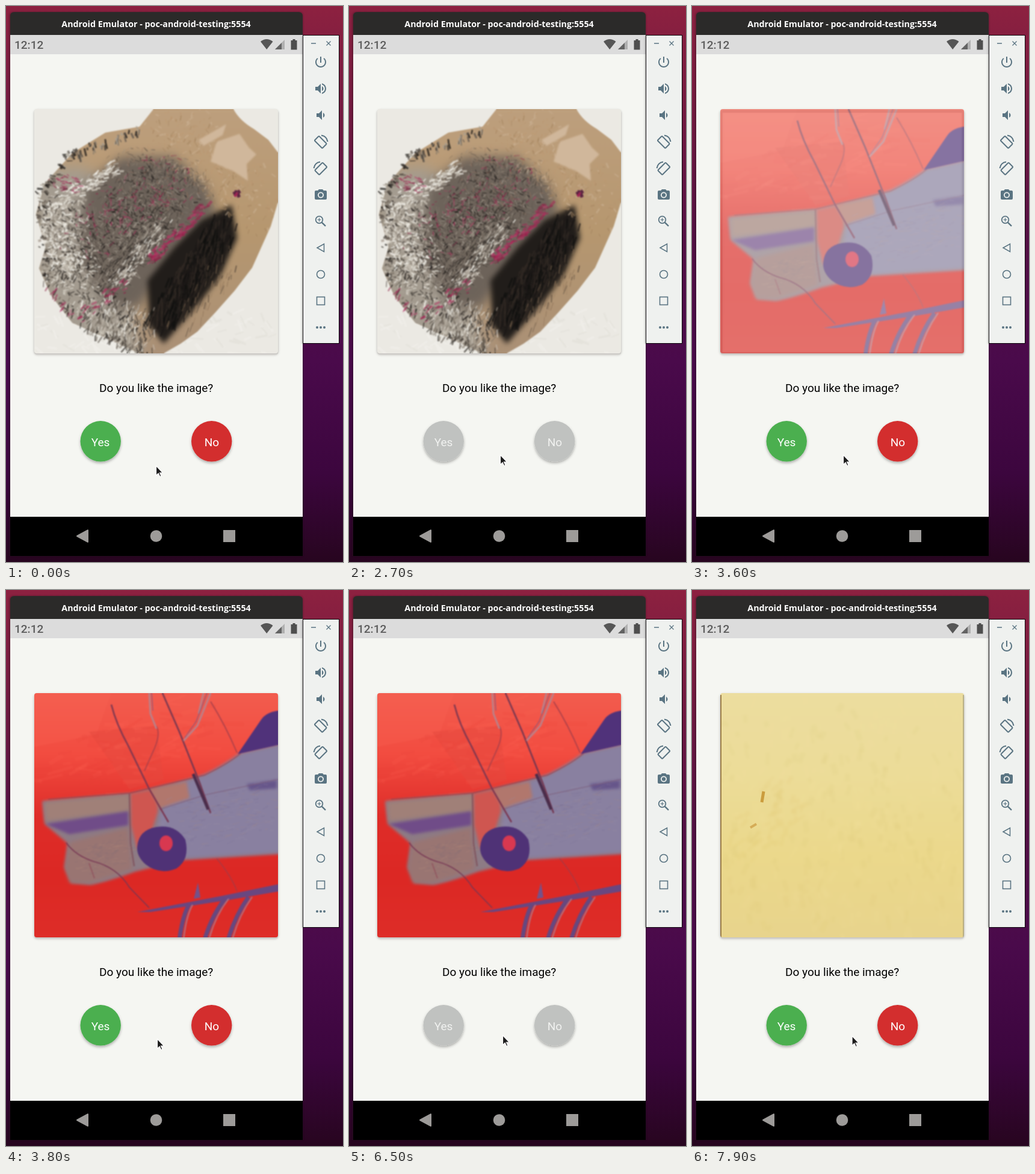
Write an HTML page with a canvas that moves like this. It is 560 px wide and 922 px high and loops after 8000 ms.

```html
<!DOCTYPE html>
<html lang="en">
<head>
<meta charset="utf-8">
<title>Image voting</title>
<style>
html, body { margin: 0; width: 100%; height: 100%; overflow: hidden; background: #4a0a48; }
svg { position: absolute; left: 0; top: 0; }
canvas { position: absolute; left: 47px; top: 171px; border-radius: 4px; }
.app { font: 19px Roboto, sans-serif; text-anchor: middle; }
.icon { fill: #5a7482; }
.line { fill: none; stroke: #5a7482; stroke-width: 1.8; }
</style>
</head>
<body>
<svg width="560" height="922" viewBox="0 0 560 922">
  <defs>
    <linearGradient id="wall" x2="0" y2="1">
      <stop offset="0" stop-color="#8d2140"/>
      <stop offset=".2" stop-color="#721940"/>
      <stop offset=".42" stop-color="#541044"/>
      <stop offset=".64" stop-color="#4a0a4b"/>
      <stop offset=".84" stop-color="#3c063e"/>
      <stop offset="1" stop-color="#27051f"/>
    </linearGradient>
    <filter id="soft" x="-20%" y="-20%" width="140%" height="140%"><feGaussianBlur stdDeviation="1.5"/></filter>
    <filter id="drop" x="-20%" y="-20%" width="140%" height="150%">
      <feDropShadow dx="0" dy="2.5" stdDeviation="2" flood-opacity=".3"/>
    </filter>
  </defs>
  <rect width="560" height="922" fill="url(#wall)"/>
  <path d="M6 912V16q0-6 6-6H487q6 0 6 6V912Z" fill="#1b1419" opacity=".5" filter="url(#soft)"/>

  <path d="M7 48V17q0-7 7-7H486q7 0 7 7V48Z" fill="#2b2a29"/>
  <text x="249.5" y="34.5" fill="#fff" text-anchor="middle" style="font:bold 14.27px 'Open Sans', sans-serif">Android Emulator - poc-android-testing:5554</text>
  <rect x="7" y="48" width="486" height="799" fill="#f5f6f2"/>
  <rect x="7" y="48" width="486" height="32" fill="#dcdcdc"/>
  <text x="14" y="71" fill="#5c5c5c" style="font:500 19px Roboto, sans-serif">12:12</text>
  <path d="M423 59q10-8 20.500 0L433.200 72Z" fill="#565656"/>
  <path d="M463 56V72H447Z" fill="#b0b0b0"/>
  <path d="M458 61V72H447Z" fill="#636363"/>
  <path d="M473.500 57H476.500V55H480.500V57H483.500V72.500H473.500Z" fill="#4e4e4e"/>

  <rect x="48" y="174" width="403" height="403" rx="4" fill="none" stroke="#bbb9b5" stroke-width="5" opacity=".6" filter="url(#soft)"/>
  <rect x="49" y="175" width="401.500" height="401" rx="2" fill="none" stroke="#cbc9c6" stroke-width="3.500"/>

  <g class="app">
    <text x="249.700" y="639.500">Do you like the image?</text>
    <g filter="url(#drop)"><circle id="yes" cx="157.200" cy="721.800" r="33.700"/></g>
    <g filter="url(#drop)"><circle id="no" cx="341.700" cy="721.800" r="33.700"/></g>
    <g id="labels" fill="#fff"><text x="157" y="729.600">Yes</text><text x="342" y="729.600">No</text></g>
  </g>

  <rect x="7" y="847" width="486" height="65"/>
  <g fill="#9d9b99">
    <path d="M118 879L136 869.200V888.800Z" stroke="#9d9b99" stroke-width="2" stroke-linejoin="round"/>
    <circle cx="249.500" cy="879" r="9.800"/>
    <rect x="361" y="869" width="20" height="20"/>
  </g>

  <rect x="491" y="50" width="3" height="510" opacity=".2" filter="url(#soft)"/>
  <rect x="493.500" y="48.500" width="60" height="511" fill="#eff1ef" stroke="#0c080c"/>
  <path class="line" style="stroke-width:1.300" d="M507 62H515M532.500 58.500L539.500 65.500M539.500 58.500L532.500 65.500"/>
  <g class="icon">
    <path transform="translate(511 81)" d="M13 3h-2v10h2V3zm4.830 2.170l-1.420 1.420C17.990 7.860 19 9.810 19 12c0 3.870-3.130 7-7 7s-7-3.130-7-7c0-2.190 1.010-4.140 2.580-5.420L6.170 5.170C4.230 6.820 3 9.260 3 12c0 4.970 4.030 9 9 9s9-4.030 9-9c0-2.740-1.230-5.180-3.170-6.830z"/>
    <path transform="translate(511 125)" d="M3 9v6h4l5 5V4L7 9H3zm13.500 3c0-1.770-1.020-3.290-2.500-4.030v8.050c1.480-.73 2.500-2.250 2.500-4.020zM14 3.230v2.060c2.890.86 5 3.540 5 6.710s-2.110 5.850-5 6.710v2.060c4.010-.91 7-4.490 7-8.770s-2.990-7.860-7-8.770z"/>
    <path transform="translate(511 169)" d="M18.500 12c0-1.770-1.020-3.290-2.500-4.030v8.050c1.480-.73 2.500-2.250 2.500-4.020zM5 9v6h4l5 5V4L9 9H5z"/>
    <path fill-rule="evenodd" transform="translate(511 301)" d="M9 3L7.170 5H4q-2 0-2 2V18q0 2 2 2H20q2 0 2-2V7q0-2-2-2H16.830L15 3ZM12 7.500a5 5 0 1 0 .01 0Z"/>
    <circle cx="523" cy="313.500" r="3.200"/>
    <circle cx="517" cy="533" r="2"/><circle cx="523" cy="533" r="2"/><circle cx="529" cy="533" r="2"/>
  </g>
  <g class="line">
    <path id="turn" stroke-width="2" d="M513.500 222L519 216.500Q520 215.500 521 216.500L532 227.500Q533 228.500 532 229.500L526.500 235Q525.500 236 524.500 235L513.500 224Q512.500 223 513.500 222ZM524 214.500Q533 216 534.500 225"/>
    <use href="#turn" transform="matrix(-1 0 0 1 1046 44)"/>
    <circle cx="520.500" cy="354.500" r="5.800"/>
    <path d="M524.800 358.800L531 365" stroke-width="2.400"/>
    <path d="M517.500 354.500H523.500M520.500 351.500V357.500" stroke-width="1.200"/>
    <path d="M517 401L528.500 394.500V407.500Z" stroke-width="1.500"/>
    <circle cx="523" cy="445" r="6.500" stroke-width="1.600"/>
    <rect x="516.500" y="482.500" width="13" height="13" stroke-width="1.600"/>
  </g>

  <path id="cursor" d="M.5 .5V16.500L4.200 13 6.800 18.500 9 17.500 6.600 12.200H11.500Z" fill="#1c1c1c" stroke="#fff" stroke-width="1.200"/>
</svg>
<script>
const SIZE = 405;
let seed = 7;
const rnd = () => {
  seed = (seed + 0x6D2B79F5) | 0;
  let t = Math.imul(seed ^ seed >>> 15, 1 | seed);
  t ^= t + Math.imul(t ^ t >>> 7, 61 | t);
  return ((t ^ t >>> 14) >>> 0) / 2 ** 32;
};
let ctx;

// Paintings are drawn in stage coordinates.
function painting(draw) {
  const canvas = document.createElement('canvas');
  canvas.width = canvas.height = SIZE;
  document.body.append(canvas);
  ctx = canvas.getContext('2d');
  ctx.translate(-47, -171);
  draw();
  return canvas;
}
const fill = (d, color) => { ctx.fillStyle = color; ctx.fill(new Path2D(d)); };
const line = (d, color, width) => {
  ctx.strokeStyle = color;
  ctx.lineWidth = width;
  ctx.stroke(new Path2D(d));
};
// Blurs what has been painted so far.
function soften(px) {
  ctx.filter = `blur(${px}px)`;
  ctx.drawImage(ctx.canvas, 47, 171);
  ctx.filter = 'none';
}
function softFill(d, color, px) {
  ctx.filter = `blur(${px}px)`;
  fill(d, color);
  ctx.filter = 'none';
}
function wash(...colors) {
  const g = ctx.createLinearGradient(0, 171, 0, 576);
  colors.forEach((c, i) => g.addColorStop(i / (colors.length - 1), c));
  return g;
}
// Short strokes scattered around the segment from (x1, y1) to (x2, y2).
function hatch(n, x1, y1, x2, y2, spread, colors, len, width, angle, sway = .5) {
  while (n--) {
    const k = rnd(), r = spread * Math.sqrt(rnd()), a = rnd() * 6.283;
    const x = x1 + (x2 - x1) * k + r * Math.cos(a);
    const y = y1 + (y2 - y1) * k + r * Math.sin(a);
    const turn = angle + (rnd() - .5) * 2 * sway, l = len * (.3 + rnd() * .7);
    line(`M${x} ${y}l${l * Math.cos(turn)} ${l * Math.sin(turn)}`,
      colors[rnd() * colors.length | 0], width * (.4 + rnd() * .6));
  }
}

function sketch() {
  const ink = ['#1c1917c0', '#39342fc0', '#5c544cc0', '#7d7468c0', '#a89f92c0'];
  const chalk = ['#e2ded5d0', '#c9c2b6d0', '#aaa196d0', '#f0ede6d0'];
  const pink = ['#a3275690', '#8f234790', '#b8356690'];
  const head = 'M222 200L245 171H378Q388 190 412 204L436 222 452 243V325L440 365 409 434 380 472 348 508 318 540 290 560 262 576H222L165 550 110 525 75 480 55 435 66 400 50 345 64 295 110 244 165 210Z';
  fill('M47 171H452V576H47Z', '#ebe9e3');
  hatch(100, 60, 540, 430, 540, 40, ['#e5e3dc', '#efede8'], 25, 4, .3, 1);
  fill(head, wash('#bd9f7d', '#b6976f', '#aa9076'));
  ctx.save();
  ctx.clip(new Path2D(head));
  softFill('M40 280L120 265 170 290 160 400 200 480 230 590 100 560 40 440Z', '#a39b8f', 12);
  softFill('M130 300L190 250 280 250 335 300 350 345 290 410 220 500 170 500 120 420Z', '#6d635a', 9);
  softFill('M375 330L384 385 355 450 315 500 262 560 238 530 235 455 280 400 325 355Z', '#211d1a', 4);
  hatch(420, 270, 190, 425, 330, 55, ['#cdb59890', '#a1815d90', '#bd9b7390', '#b8967090'], 9, 2.500, 1.5, 1.5);
  softFill('M320 222L366 196 360 214 328 232ZM350 225L388 212 404 235 416 246 400 262 402 290 378 274 340 258Z', '#d0b79b', 1);
  hatch(800, 85, 320, 110, 480, 50, [...ink, ...chalk], 11, 2.500, 1, 1.5);
  hatch(1300, 150, 420, 255, 315, 68, ink, 11, 1.6, 1.3, 1.4);
  hatch(450, 200, 275, 300, 300, 48, ['#514a4490', '#2d292590', '#9b8c7c90', '#9b746090'], 10, 1.3, 1.5, 1.5);
  hatch(150, 75, 335, 180, 270, 13, chalk, 11, 4, -.5, .5);
  hatch(200, 75, 350, 105, 430, 26, chalk, 9, 3.500, 1, 1.5);
  hatch(160, 260, 365, 180, 465, 15, chalk, 11, 2.500, -.8, .5);
  hatch(130, 255, 350, 165, 460, 22, ink, 16, 2, -.9, .3);
  hatch(400, 140, 510, 225, 535, 42, [...ink, ...chalk], 13, 2.500, 1.8, .8);
  hatch(350, 362, 365, 262, 510, 26, ['#11100fc0', '#1c1917c0', '#302923c0'], 26, 3.500, 1.8, .25);
  hatch(70, 372, 420, 290, 525, 24, ['#92765ab0', '#3a3129b0'], 18, 1.5, 1.8, .2);
  hatch(90, 328, 335, 235, 425, 9, pink, 13, 5, -.5, .4);
  hatch(35, 200, 460, 115, 520, 12, pink, 12, 4, -.6, .4);
  hatch(150, 130, 380, 280, 280, 52, pink, 11, 2, -.1, 1.7);
  hatch(35, 80, 290, 115, 300, 18, pink, 10, 2.500, .2, .5);
  hatch(10, 382, 306, 384, 309, 5, ['#a02455', '#5b2440'], 10, 5, 1.5);
  ctx.restore();
  hatch(45, 225, 202, 115, 242, 8, ink, 14, 3.500, 1.5, .4);
  hatch(45, 110, 240, 55, 310, 9, ink, 10, 4, .5, .6);
  hatch(55, 55, 320, 65, 450, 8, [...ink, ...chalk], 11, 4, .2, .6);
  hatch(35, 65, 450, 115, 515, 8, [...ink, ...pink], 12, 3, 2, .6);
  hatch(60, 130, 530, 230, 572, 9, ink, 12, 2.500, 1.9, .6);
  soften(1);
}

function abstract() {
  fill('M47 171H452V576H47Z', wash('#f25c4e', '#f24c40', '#df2d29', '#dc2824', '#de2d28'));
  fill('M47 171H175L150 240 47 260Z', '#f8665440');
  fill('M138 235L250 225 262 315 205 330Z', '#e5483f80');
  hatch(100, 70, 330, 320, 200, 60, ['#ff6b5920', '#e43c3520'], 45, 8, -.2, .4);
  softFill('M60 350L208 337 330 307Q365 290 390 271L460 255V437L300 447 215 467Q165 485 140 489L108 486 97 460 102 420 64 388Z', '#8d7b85', 2);
  softFill('M285 322L330 307Q365 290 390 271L460 255V435L300 445 250 425 255 370Z', '#8980a0', 3);
  softFill('M64 352L206 339V367L110 378 66 383Z', '#a08078', 3);
  softFill('M106 418L203 394 210 463 140 486 106 485 98 460Z', '#997572', 3);
  softFill('M66 388L203 367V390L105 405Z', '#704c88', 2);
  fill('M452 200Q432 203 424 215L385 272 452 257Z', '#50327a');
  softFill('M207 338L252 329 252 368 242 400 218 430 208 390Z', '#cf5650', 2);
  softFill('M238 331L300 318 305 345 255 362Z', '#b1776d', 2);
  softFill('M400 322L450 315V329L405 332Z', '#66558a', 2);
  hatch(220, 290, 390, 440, 360, 50, ['#9a90a640', '#776d9540', '#a5888840'], 14, 2, -.2, .4);
  hatch(140, 125, 450, 190, 430, 25, ['#8a6e7550', '#ad857a50'], 12, 2, -.2, .4);
  line('M255 364L330 340 452 314', '#7b5c79a0', 1.5);
  line('M70 347L205 337 330 307Q370 288 390 271', '#863f50b0', 1.5);
  fill('M218 426Q220 398 250 393 282 388 298 414 306 447 283 462 255 473 232 455 217 442 218 426Z', '#4f3276');
  ctx.beginPath();
  ctx.ellipse(266, 420, 11, 13, 0, 0, 7);
  ctx.fillStyle = '#d83850';
  ctx.fill();
  fill('M218 534L360 507 452 488V500L370 514 240 534Z', '#694780');
  fill('M312 512L319 485 323 510Z', '#74528a');
  for (const [x, y, w] of [[304, 522, 16], [364, 512, 34], [403, 509, 34]]) {
    line(`M${x} ${y}Q${x - w * .65} 540 ${x - w} 580`, '#66487f', 7);
    line(`M${x + 6} ${y}Q${x + 6 - w * .65} 540 ${x - w + 7} 580`, '#b07888', 2);
  }
  line('M175 190Q183 222 203 258L238 330 270 385', '#7a3650', 2.500);
  line('M260 171L288 235 322 320 340 370', '#733650', 2.500);
  line('M311 305L336 364', '#4a2d4b', 5);
  line('M250 226Q257 238 247 262L230 300M340 185Q365 225 384 270', '#a33e4a', 1.6);
  line('M205 338L207 420 213 458', '#7c4a54b0', 2.500);
  line('M100 419Q115 440 145 450 185 460 205 493L238 527', '#763653', 1.7);
  line('M138 453L147 478M350 445Q375 475 384 500', '#8f4051b0', 1.5);
  line('M238 171L240 205 250 230M328 171L320 205M340 171L318 225 295 250', '#b9818a', 3);
  line('M242 171L244 200M334 171L316 218 297 245', '#7f5880', 1.2);
  soften(.9);
}

function parchment() {
  fill('M47 171H452V576H47Z', wash('#ecdd9f', '#ecdc98', '#ebd88b', '#e8d48c'));
  hatch(380, 80, 373, 420, 373, 200, ['#f3e3a01c', '#d9bd6918'], 24, 10, 1.6, .6);
  hatch(45, 105, 400, 160, 340, 45, ['#d4ae5014'], 25, 9, 2.200, .6);
  soften(2);
  line('M119 334L116 352', '#cb9c3d', 5);
  line('M97 394L107 388', '#d5ac57', 4);
  line('M48 174V576', '#9b7d48', 2);
  line('M451 174V576', '#aaa27d', 1.5);
  soften(.7);
}

const pictures = [sketch, abstract, parchment].map(painting);
// Time and pointer tip.
const path = [
  [0, 249, 762], [500, 186, 739], [1600, 186, 739], [2000, 211, 752], [2700, 251, 744],
  [3800, 251, 744], [4200, 259, 742], [4300, 259, 742], [4400, 263, 742], [4800, 263, 742],
  [5300, 167.5, 722], [5600, 167.5, 722], [6300, 253, 738], [6400, 253, 738], [6500, 255, 738],
  [7000, 255, 738], [7100, 257, 738], [7400, 257, 738], [7600, 262.5, 739], [7900, 265.5, 739]
];
const $ = id => document.getElementById(id);
const clamp = v => Math.max(0, Math.min(1, v));
const within = (t, a, b) => t >= a && t < b;

function render(now) {
  const t = Math.floor(now % 8000 / 100) * 100;
  const i = path.findLastIndex(p => p[0] <= t);
  const [t0, x0, y0] = path[i], [t1, x1, y1] = path[i + 1] || [8000, x0, y0];
  const k = (t - t0) / (t1 - t0);
  $('cursor').setAttribute('transform', `translate(${x0 + (x1 - x0) * k} ${y0 + (y1 - y0) * k})`);

  const off = within(t, 1400, 3400) || within(t, 5700, 7500);
  const pressed = within(t, 1200, 1400) || within(t, 5500, 5700);
  $('yes').setAttribute('fill', off ? '#c0c2c0' : pressed ? '#76c279' : '#4caf50');
  $('no').setAttribute('fill', off ? '#c0c2c0' : '#d32f2f');
  $('labels').setAttribute('fill', off ? '#f1f2f0' : '#fff');

  const shown = [t < 3400, t < 7500 && clamp((t - 3400) / 300), clamp((t - 7600) / 300)];
  pictures.forEach((p, n) => p.style.opacity = +shown[n]);
}

let start;
function tick(now) {
  start ??= now;
  render(now - start);
  requestAnimationFrame(tick);
}
render(0);
requestAnimationFrame(tick);
</script>
</body>
</html>
```
